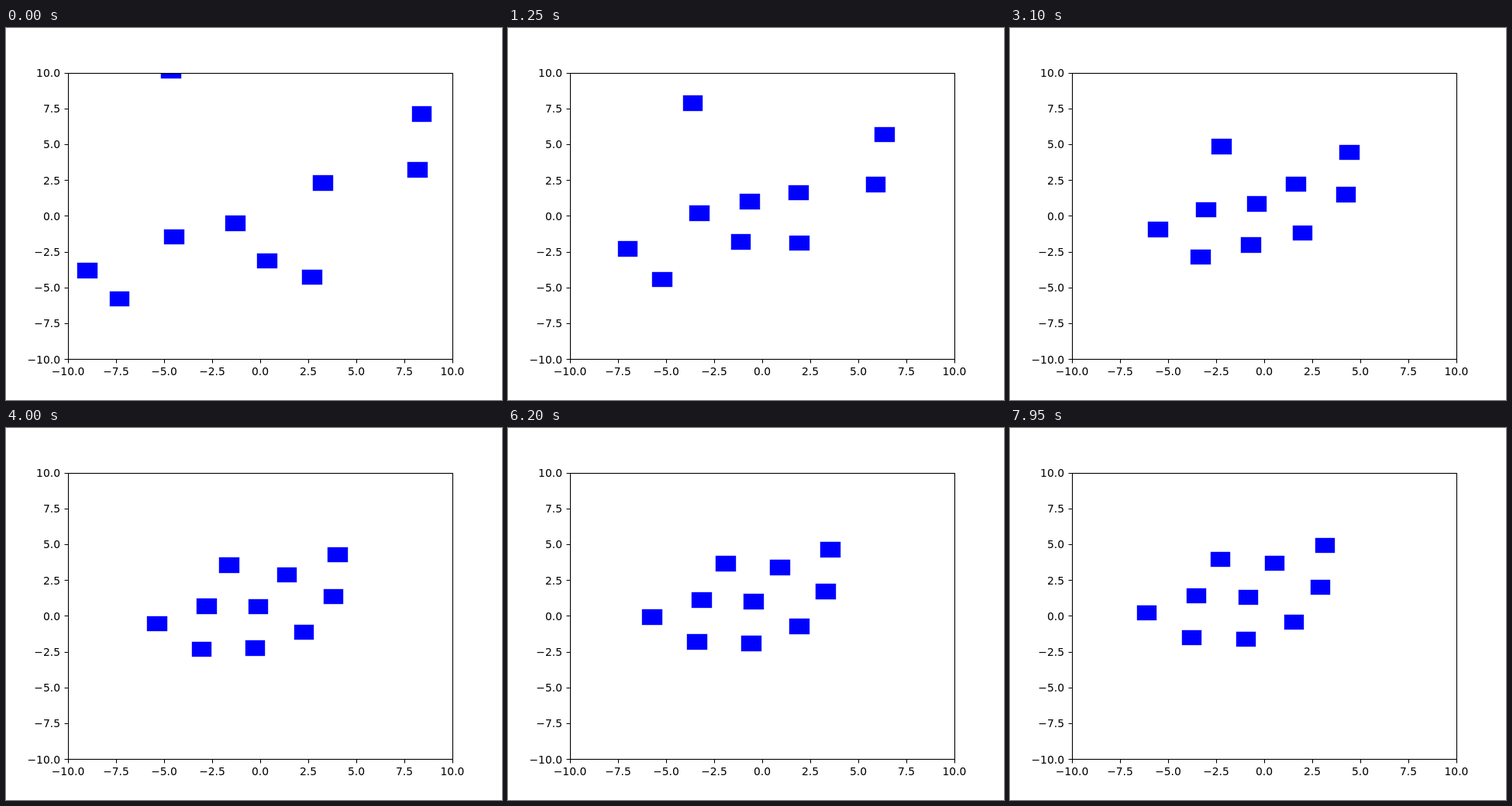
Animation of 640x480 px, one loop 8000 ms. Source, as an HTML page:

```html
<!DOCTYPE html>
<html lang="en">
<head>
<meta charset="utf-8">
<title>Gathering blocks</title>
<style>
  html, body { margin: 0; width: 100%; height: 100%; overflow: hidden; background: #fff; }
  svg { display: block; width: 640px; height: 480px; }
  text { font: 13.89px "DejaVu Sans", sans-serif; }
  .axis { fill: none; stroke: #000; stroke-width: 1.1; }
  .block { fill: #00f; stroke: #00f; stroke-width: 1.39; }
</style>
</head>
<body>
<svg viewBox="0 0 640 480">
  <clipPath id="plot"><rect x="80" y="58" width="496" height="369.5"/></clipPath>
  <g id="blocks" clip-path="url(#plot)"></g>
  <g id="axes"><rect class="axis" x="80.5" y="58.5" width="496" height="369"/></g>
</svg>
<script>
  const LOOP = 8000, STEP = 50;
  const UNIT_X = 24.8, UNIT_Y = 18.48;      // pixels per axis unit, also the block size
  const SPEED = 2;                          // axis units per second while gathering
  const MEET = 2.25, SETTLE = 4.2;          // seconds
  const DRIFT_X = -5.2, DRIFT_Y = -3.4;     // pixels per second once settled
  const axes = document.getElementById('axes');
  const layer = document.getElementById('blocks');

  function add(parent, tag, attrs, text = '') {
    const node = document.createElementNS('http://www.w3.org/2000/svg', tag);
    for (const name in attrs) node.setAttribute(name, attrs[name]);
    node.textContent = text;
    parent.append(node);
    return node;
  }

  for (let i = 0; i <= 8; i++) {
    const label = (2.5 * i - 10).toFixed(1).replace('-', '\u2212');
    const x = 80 + 2.5 * UNIT_X * i;
    const y = 427.2 - 2.5 * UNIT_Y * i;
    const row = Math.round(y) + 0.5;
    add(axes, 'path', { class: 'axis', d: `M${x + 0.5} 427.5v5M80.5 ${row}h-5` });
    add(axes, 'text', { x, y: 448, 'text-anchor': 'middle' }, label);
    add(axes, 'text', { x: 70, y: Math.round(y + 5.3), 'text-anchor': 'end' }, label);
  }

  // Centres in pixels: where a block starts, meets the others and settles.
  const blocks = [];
  function block(start, meet, settle) {
    const distance = Math.hypot((meet[0] - start[0]) / UNIT_X, (meet[1] - start[1]) / UNIT_Y);
    const node = add(layer, 'rect', { class: 'block' });
    blocks.push({ node, start, meet, settle, arrival: Math.min(MEET, distance / SPEED) });
  }

  block([213, 55], [259, 131], [291, 182]);
  block([536.5, 111], [447, 157.5], [426, 164]);
  block([531, 183], [444, 212.5], [420, 218]);
  block([409, 200], [375, 212.5], [361, 187]);
  block([296, 252], [312, 224], [327, 231]);
  block([217, 269.5], [247, 239], [260, 229]);
  block([337, 300.5], [300.5, 276], [324, 285]);
  block([395, 321.5], [371, 266], [386, 263]);
  block([105, 313], [187, 267], [196, 251]);
  block([146.5, 349.5], [240, 305], [254, 283]);

  const mix = (a, b, k) => a.map((v, i) => v + (b[i] - v) * Math.min(1, k));

  function position({ start, meet, settle, arrival }, t) {
    if (t < MEET) return mix(start, meet, t / arrival);
    const [x, y] = mix(meet, settle, (t - MEET) / (SETTLE - MEET));
    const drifting = Math.max(0, t - SETTLE);
    return [x + DRIFT_X * drifting, y + DRIFT_Y * drifting];
  }

  const snap = v => Math.floor(v) + 0.5;

  // Snaps both edges of a side to pixel centres.
  function setSide(node, offset, size, centre, length) {
    const from = snap(centre - length / 2);
    node.setAttribute(offset, from);
    node.setAttribute(size, snap(centre + length / 2) - from);
  }

  function draw(now) {
    const t = Math.floor((now % LOOP) / STEP) * STEP / 1000;
    for (const item of blocks) {
      const [x, y] = position(item, t);
      setSide(item.node, 'x', 'width', x, UNIT_X);
      setSide(item.node, 'y', 'height', y, UNIT_Y);
    }
  }

  let start;
  function tick(now) {
    start ??= now;
    draw(now - start);
    requestAnimationFrame(tick);
  }
  draw(0);
  requestAnimationFrame(tick);
</script>
</body>
</html>
```
